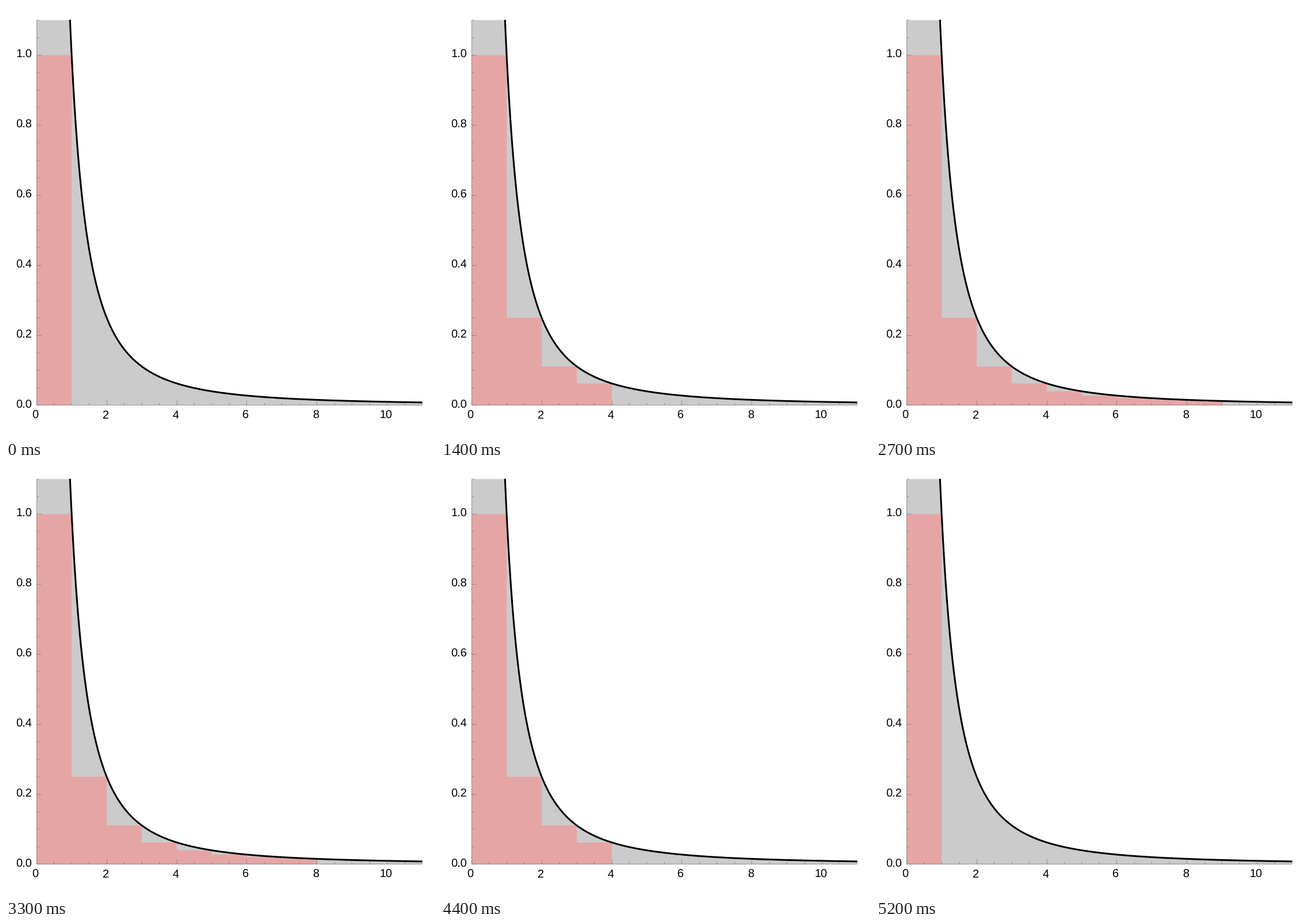
Write a matplotlib script that moves like this. It is 746x750 px and loops after 6 s.

```python
import numpy as np
import matplotlib.pyplot as plt
from matplotlib.animation import FuncAnimation
from matplotlib.collections import LineCollection
from matplotlib.patches import Polygon, Rectangle

W, H, DPI = 746, 750, 100
PT = 72 / DPI                     # points per pixel
FRAMES, INTERVAL = 60, 100
X_MAX, Y_MAX = 11, 1.1
STEPS = [8, 11, 14, 16, 19, 22, 25, 27]   # when each further bar appears

plt.rcParams["font.family"] = "Liberation Sans"
plt.rcParams["text.hinting"] = "none"


def px(x):
    return 53.2 + 60.95 * np.asarray(x, float)


def py(y):
    return 694.9 - 609.4 * np.asarray(y, float)


def centre(v):
    """Middle of the pixel that holds v, for crisp hairlines."""
    return np.floor(v) + 0.5


def points(x, y):
    return np.column_stack([px(x), py(y)])


fig = plt.figure(figsize=(W / DPI, H / DPI), dpi=DPI, facecolor="white")
ax = fig.add_axes([0, 0, 1, 1])
ax.set_xlim(0, W)
ax.set_ylim(H, 0)
ax.axis("off")

left, right = float(px(0)), float(px(X_MAX))
top, bottom = float(py(Y_MAX)), float(py(0))

# Area under 1/x^2, cut off at the top of the plot
x = np.linspace(1 / np.sqrt(Y_MAX), X_MAX, 600)
area = np.vstack([points([0, 0], [0, Y_MAX]), points(x, x ** -2.0),
                  points([X_MAX], [0])])
ax.add_patch(Polygon(area, fc="#cbcbcb", ec="none", snap=False, zorder=1))

bars = Polygon(points([0, 0, 1, 1], [0, 1, 1, 0]), fc="#e6a5a5", ec="none",
               snap=False, zorder=2)
ax.add_patch(bars)

x = np.linspace(0.9, X_MAX + 0.1, 800)
curve, = ax.plot(px(x), py(x ** -2.0), color="black", lw=3 * PT, zorder=3)
curve.set_clip_path(Rectangle((left, top - 0.5), right - left + 0.3,
                              bottom - top + 0.5, transform=ax.transData))

# Axes and ticks
ax_x, ax_y = centre(left), centre(bottom)
lines = [[(left, ax_y), (right, ax_y)], [(ax_x, top), (ax_x, bottom)]]
for i in range(23):
    size = 8 if i % 4 == 0 else 4
    tx, ty = centre(px(i * 0.5)), centre(py(i * 0.05))
    lines.append([(tx, ax_y - 0.5), (tx, ax_y - size)])
    lines.append([(ax_x + 0.5, ty), (ax_x + size, ty)])
ax.add_collection(LineCollection(lines, colors=[(0.4, 0.4, 0.4, 0.6)],
                                 linewidths=PT, capstyle="butt", snap=False,
                                 zorder=4))

label = dict(size=20 * PT, va="baseline", zorder=5)
for i in range(6):
    ax.text(px(2 * i) - 2, 718, str(2 * i), ha="center", **label)
    ax.text(45.4, py(0.2 * i) + 4.6, f"{0.2 * i:.1f}", ha="right", **label)


def bar_count(frame):
    return 1 + sum(s <= frame < FRAMES - s for s in STEPS)


def update(frame):
    n = np.arange(1, bar_count(frame) + 1)
    xs = np.column_stack([n - 1, n]).ravel()
    ys = np.repeat(n ** -2.0, 2)
    bars.set_xy(np.vstack([points([0], [0]), points(xs, ys),
                           points([n[-1]], [0])]))
    return [bars]


anim = FuncAnimation(fig, update, frames=FRAMES, interval=INTERVAL,
                     repeat=True, repeat_delay=0, blit=False)
plt.show()
```
